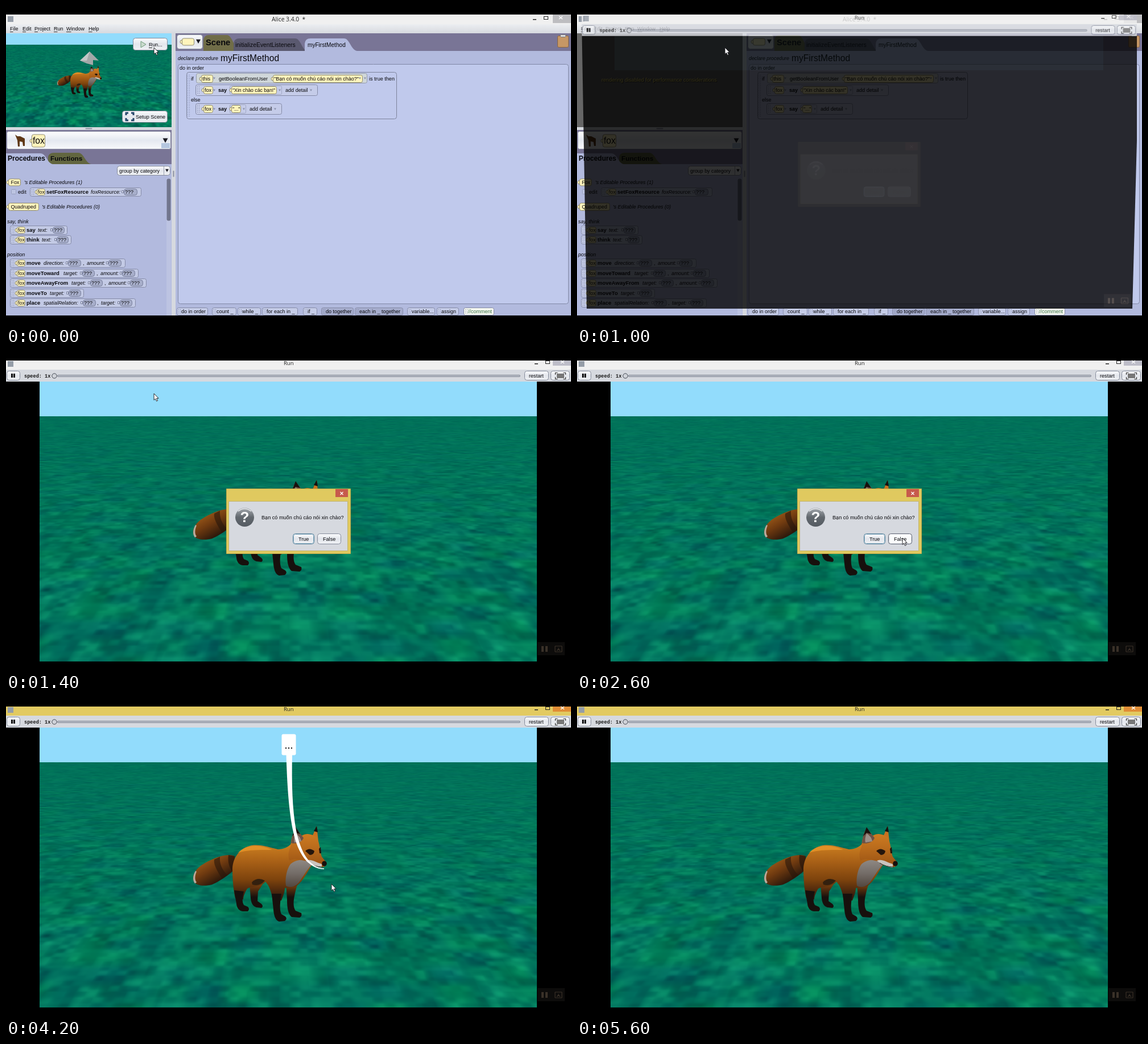
An HTML page with a canvas that plays this animation: 993 by 559 pixels, repeating every 5800 ms.

```html
<!DOCTYPE html>
<html lang="en">
<head>
<meta charset="utf-8">
<title>Alice run</title>
<style>
html, body { margin: 0; width: 100%; height: 100%; overflow: hidden; background: #000; }
canvas { display: block; }
</style>
</head>
<body>
<canvas id="stage" width="993" height="559"></canvas>
<script>
const W = 993, H = 559, LOOP = 5800, STEP = 200;
const SANS = '"Liberation Sans", Arial, sans-serif';
const TITLE = '"Open Sans", sans-serif';
const MONO = '"Liberation Mono", monospace';
const LAV = '#b2bade', PAPER = '#c0c9ec', PURPLE = '#797596', CHROME = '#d6d9df', GOLD = '#e2ca61';
const stage = document.getElementById('stage').getContext('2d');
let c = stage;

function makeLayer(w, h) {
  const el = document.createElement('canvas');
  el.width = w;
  el.height = h;
  return el.getContext('2d');
}

// ---- drawing helpers ----
function rect(x, y, w, h, fill) {
  c.fillStyle = fill;
  c.fillRect(x, y, w, h);
}

function box(x, y, w, h, r, fill, line) {
  c.beginPath();
  c.roundRect(x + .5, y + .5, w - 1, h - 1, r);
  if (fill) { c.fillStyle = fill; c.fill(); }
  if (line) { c.strokeStyle = line; c.lineWidth = 1; c.stroke(); }
}

function shape(d, fill, line, width = 1) {
  const p = new Path2D(d);
  if (fill) { c.fillStyle = fill; c.fill(p); }
  if (line) { c.strokeStyle = line; c.lineWidth = width; c.stroke(p); }
}

function disc(x, y, rx, ry, fill, line) {
  c.beginPath();
  c.ellipse(x, y, rx, ry, 0, 0, 7);
  c.fillStyle = fill;
  c.fill();
  if (line) { c.strokeStyle = line; c.lineWidth = 1; c.stroke(); }
}

function grad(y0, y1, ...stops) {
  const g = c.createLinearGradient(0, y0, 0, y1);
  stops.forEach((s, i) => g.addColorStop(i / (stops.length - 1), s));
  return g;
}

// y is the middle of the capitals
function text(s, x, y, size = 9.1, style = '', color = '#08080c', family = SANS) {
  c.font = `${style} ${size}px ${family}`;
  c.fillStyle = color;
  c.fillText(s, x, y + size * .35);
}

const bold = (s, x, y, size = 9.5) => text(s, x, y, size, 'bold');
const ital = (s, x, y, size = 8.9) => text(s, x, y, size, 'italic');
const down = (x, y, r, color = '#181820') =>
  shape(`M${x - r} ${y - r * .8}h${2 * r}l${-r} ${r * 1.8}z`, color);

function button(x, y, w, h, line = '#858b9b') {
  box(x, y, w, h, 4, grad(y, y + h, '#fbfcfd', '#e3e6ec', '#f0f2f5'), line);
}

function grip(x, y, h) {
  for (let j = 2; j < h - 2; j += 3)
    for (let i = 0; i < 2; i++) rect(x + i * 3, y + j, 1, 1, '#727a9c');
}

function tile(x, y, w, h, fill = '#c3cae5') {
  box(x, y, w, h, 3, fill, '#858ba8');
  grip(x + 3, y + 1, h - 1);
}

function chip(x, y, w, h, label, size = 9.1) {
  const top = y - h / 2, line = '#8f8b70';
  disc(x, y, 3, 3, '#fff4bc', line);
  box(x, top, w, h, 3, '#fff4bc', line);
  text(label, x + 2, y, size);
}

function slot(x, y, w) {
  rect(x, y - 3, 4, 5, '#d5daec');
  box(x, y - 3, 4, 5, 0, null, '#777e9c');
  box(x + 4, y - 6, w - 4, 12, 4, '#a7aeca', '#777e9c');
  text('???', x + 6, y, 9.1);
}

function cursor(x, y) {
  shape(`M${x} ${y}v11.5l2.6-2.3 1.9 4.2 2-.9-1.9-4.1h3.5z`, '#fff', '#15151a', .9);
}

// ---- ground texture ----
function hash(x, y) {
  let n = Math.imul(x, 374761393) + Math.imul(y, 668265263);
  n = Math.imul(n ^ (n >>> 13), 1274126177);
  return ((n ^ (n >>> 16)) >>> 0) / 4294967296;
}

function noise(x, y) {
  const ix = Math.floor(x), iy = Math.floor(y);
  let fx = x - ix, fy = y - iy;
  fx *= fx * (3 - 2 * fx) / fx || 0;
  fy *= fy * (3 - 2 * fy) / fy || 0;
  const a = hash(ix, iy), b = hash(ix + 1, iy);
  const e = hash(ix, iy + 1), f = hash(ix + 1, iy + 1);
  const top = a + (b - a) * fx, bottom = e + (f - e) * fx;
  return top + (bottom - top) * fy;
}

function makeGround(w, h) {
  const g = makeLayer(w, h), img = g.createImageData(w, h);
  for (let y = 0, i = 0; y < h; y++) {
    const d = y + 73, v = 10900 / d, amp = Math.min(1, .05 + d / 400);
    for (let x = 0; x < w; x++, i += 4) {
      const u = (x - w / 2) / (d + 160) * 17;
      const n = (noise(u, v) * .6 + noise(u * 2.1, v * 2.1) * .4 - .5) * amp;
      const m = (noise(u * .6 + 90, v * .6) - .5) * amp;
      img.data[i] = Math.max(0, 1 + n * 20);
      img.data[i + 1] = 113 + n * 62 + m * 18 + y * .012;
      img.data[i + 2] = 89 + n * 34 - m * 8 + y * .008;
      img.data[i + 3] = 255;
    }
  }
  g.putImageData(img, 0, 0);
  return g.canvas;
}

const ground = makeGround(874, 431);

// ---- scene ----
function fox() {
  const dark = '#17100d';
  const leg = grad(325, 350, '#8a4a11', '#4e2a0e', dark);
  shape('M428 326L430 352C431 361 434 366 440 368L449 369Q453 366 449 362L442 357 443 340 452 326Z', leg);
  shape('M492 322L494 355C494 370 496 380 502 385L516 386Q521 383 519 378L509 374C503 365 505 350 514 322Z', leg);
  // tail
  const t = c.createLinearGradient(340, 283, 366, 328);
  t.addColorStop(0, '#a5601a');
  t.addColorStop(.5, '#6f3a10');
  t.addColorStop(1, '#28160b');
  shape('M402 278C388 271 360 283 345 293C334 300 326 312 330 322C334 331 350 331 362 328C378 321 394 309 401 302Z', t);
  shape('M366 284C364 294 374 308 380 318L389 311C379 302 375 290 376 279Z', 'rgba(40,22,10,.6)');
  shape('M391 276C389 288 393 298 397 304L402 300V278Z', 'rgba(40,22,10,.7)');
  shape('M333 304C328 313 328 321 332 326L335 324C331 319 332 312 335 305Z', '#b9aca0');
  // body
  shape('M398 304C397 283 410 263 432 259C450 257 463 263 478 266C488 266 497 262 503 254L525 250 540 290C530 304 524 320 510 331L490 334C490 342 486 350 484 356L469 356C467 343 463 330 456 323C446 334 432 330 424 335C420 342 417 348 417 354L403 352C400 340 398 320 398 304Z',
    grad(258, 350, '#cb7e20', '#a75f16', '#7d430d', '#33190d'));
  shape('M408 272C420 258 446 256 468 267C448 267 428 266 408 272Z', 'rgba(240,156,44,.7)');
  shape('M432 324Q442 314 455 321Q445 332 433 328Z', '#33200f');
  shape('M401 338L405 362C406 370 410 374 416 375L425 375Q429 371 425 367L418 364C414 357 416 348 418 340Z', dark);
  shape('M467 344L470 372C471 384 474 391 480 393L490 392Q495 388 491 384L484 380C480 371 482 358 484 344Z', dark);
  // chest
  shape('M500 292C512 282 528 283 538 292C528 303 522 314 515 324C507 333 498 334 492 330C490 315 494 300 500 292Z',
    grad(284, 333, '#8f8984', '#736c67', '#50453d'));
  // head
  shape('M537 246L546 225 549 252Z', '#c87220');
  shape('M541 234L546 225 548 236Z', dark);
  shape('M500 262C501 246 505 236 509 230L520 242C527 237 537 238 546 245C552 255 551 268 555 279L563 289C564 294 560 298 554 297L529 287C518 285 508 280 498 286C495 276 497 268 500 262Z',
    grad(232, 296, '#d37f22', '#b96b1c', '#995213'));
  shape('M501 255C502 242 506 234 509 228L523 246C520 254 509 257 501 255Z', '#6d5145');
  shape('M509 238Q505 248 507 254L519 252Q518 244 509 238Z', '#9c9089');
  shape('M503 243L509 227 517 239 509 237Z', dark);
  shape('M526 269Q533 262 542 269 541 276 534 276Z', '#24150c');
  shape('M550 265L553 262 554 273 551 273Z', '#24150c');
  shape('M527 286C536 282 543 288 555 292L555 298C545 297 537 294 527 286Z', '#c9c4be');
  shape('M532 290Q543 297 556 297', null, '#33231c', 1);
  disc(559.5, 291, 4.3, 4.6, dark);
}

function scene() {
  rect(59, 52, 874, 62, '#92dcfc');
  c.drawImage(ground, 59, 113);
  fox();
}

function bubble(k) {
  c.save();
  c.translate(559, 300);
  c.scale(k, k);
  c.translate(-559, -300);
  shape('M492.5 100H503C502 150 503 195 510 233C518 270 532 298 559 299.5V301C530 300 513 272 505 236C497 200 494 150 492.5 100Z', '#fff');
  box(484, 63, 26, 38, 3, '#fff');
  for (let i = 0; i < 3; i++) rect(491 + i * 5, 87, 2, 2, '#111');
  c.restore();
}

// ---- editor ----
function windowButtons(x, y, bg, h) {
  rect(961, 15, 32, h, bg);
  rect(x - 3, y + 1, 6, 1.5, '#222');
  c.strokeStyle = '#222';
  c.lineWidth = 1;
  c.strokeRect(x + 16.5, y - 3.5, 7, 5);
  shape(`M${x + 43} ${y - 4}l6 5m0-5l-6 5`, null, '#fff', 1.3);
}

function menuBar() {
  rect(0, 15, W, 17, '#f0f0f0');
  rect(3, 18, 10, 10, '#959da8');
  text('Alice 3.4.0  *', 467, 23, 10.3, '', '#222', TITLE);
  windowButtons(929, 22, '#bdbdc0', 15);
  rect(0, 32, W, 16, grad(32, 48, '#eceef1', CHROME));
  const menus = { File: 7, Edit: 29, Project: 50, Run: 84, Window: 106, Help: 145 };
  for (const [name, x] of Object.entries(menus)) {
    text(name, x, 40, 9);
    rect(x, 45, c.measureText(name[0]).width, 1, '#333');
  }
}

function preview(live) {
  if (!live) {
    rect(0, 48, 291, 165, '#666');
    const msg = 'rendering disabled for performance considerations';
    text(msg, 44, 131, 9.1, '', '#111');
    text(msg, 43, 130, 9.1, '', '#ffec6a');
    return;
  }
  c.save();
  c.beginPath();
  c.rect(0, 48, 291, 165);
  c.clip();
  rect(0, 205, 291, 8, '#00735b');
  c.translate(0, 48);
  c.scale(1 / 3, 1 / 3);
  c.translate(-59, -53);
  scene();
  c.restore();
  shape('M147 80L163 96 153 95V104L142 101 130 96Z', '#a3a8a8');
  shape('M147 80L130 96 142 96Z', '#c3c7c7');
  button(223, 56, 61, 22);
  shape('M237 62l9 5.5-9 5.5z', '#c9dacd', '#6f9a7a');
  text('Run...', 251, 68, 8.9);
  rect(251, 73, 6, 1, '#222');
  button(204, 184, 80, 21);
  shape('M211 192v-4h4m5 0h4v4m0 5v4h-4m-5 0h-4v-4', null, '#27476b', 3);
  text('Setup Scene', 228, 195);
}

function methodRow(y, x, w, name, params) {
  tile(x, y - 8, w, 16);
  chip(x + 12, y, 15, 12, 'fox', 8.9);
  bold(name, x + 29, y);
  params.forEach(([label, lx, sx, sw], i) => {
    if (i) text(',', lx - 7, y);
    ital(label, lx, y);
    slot(sx, y, sw);
  });
}

function members() {
  rect(0, 213, 292, 5, CHROME);
  box(139, 214, 13, 3, 1, '#8c92a2');
  rect(0, 218, 292, 60, PURPLE);
  box(1, 220, 289, 32, 3, grad(220, 252, '#fff', '#e4e8f0', '#f8f9fb'), '#8d90a6');
  shape('M16 226L20 229 25 229 33 233 33 246 30 246 29 239 24 238 24 247 21 247 20 236Z', '#5e3715');
  chip(45, 237, 24, 23, 'fox', 15.7);
  rect(273, 241, 15, 9, '#b5c7e0');
  down(280, 236, 4.5);
  shape('M74 278V266Q75 258 84 258H127C137 258 139 276 150 278Z', '#626640');
  rect(0, 278, 292, 266, LAV);
  shape('M0 278V259H60C71 259 72 276 82 278Z', LAV);
  bold('Procedures', 3, 268, 12);
  bold('Functions', 78, 268, 11.8);
  button(195, 281, 94, 17);
  text('group by category', 199, 290, 8.9);
  rect(277, 282, 1, 15, '#9ba1b1');
  down(283, 289, 2.8);
  rect(282, 303, 8, 241, '#bcc3e2');
  box(282, 303, 8, 75, 3, '#71758d');

  chip(4, 310, 22, 13, ' Fox', 8.9);
  ital("'s Editable Procedures (1)", 32, 310);
  box(9, 322, 9, 9, 1, '#bcc4e2', '#99a1c0');
  text('edit', 21, 327);
  methodRow(327, 42, 196, 'setFoxResource', [['foxResource:', 149, 203, 28]]);
  chip(4, 353, 54, 14, ' Quadruped', 8.9);
  ital("'s Editable Procedures (0)", 63, 353);
  ital('say, think', 2, 379, 9.1);
  methodRow(394, 7, 101, 'say', [['text:', 56, 78, 25]]);
  methodRow(411, 7, 108, 'think', [['text:', 63, 85, 25]]);
  ital('position', 2, 437, 9.1);
  methodRow(452, 7, 203, 'move', [['direction:', 66, 105, 27], ['amount:', 142, 176, 27]]);
  methodRow(470, 7, 226, 'moveToward', [['target:', 101, 130, 26], ['amount:', 166, 200, 27]]);
  methodRow(487, 7, 240, 'moveAwayFrom', [['target:', 115, 144, 26], ['amount:', 180, 214, 27]]);
  methodRow(505, 7, 130, 'moveTo', [['target:', 77, 106, 26]]);
  methodRow(522, 7, 221, 'place', [['spatialRelation:', 66, 131, 27], ['target:', 167, 196, 26]]);
  rect(291, 48, 7, 496, CHROME);
  box(293, 289, 3, 12, 1, '#8c92a2');
}

function codeTabs() {
  rect(298, 48, 695, 31, PURPLE);
  button(300, 50, 46, 26);
  chip(309, 63, 22, 13, '');
  down(338, 62, 4);
  shape('M347 79V60Q348 51 357 51H388C398 51 401 76 412 79Z', '#706d48');
  bold('Scene', 351, 64, 14.7);
  shape('M400 79V66Q401 57 410 57H508C518 57 520 77 529 79Z', '#5a596f');
  text('initializeEventListeners', 403, 68, 10.4);
  shape('M525 79V66Q526 57 535 57H594C604 57 606 77 617 79Z', LAV);
  text('myFirstMethod', 530, 68, 10.1);
  box(969, 52, 20, 21, 2, '#c69765', '#8d663e');
  box(974, 50, 10, 5, 1, '#ddd', '#777');
}

function sayRow(y, w, arg, argW, detailX) {
  tile(333, y - 10, w, 20, '#c5cce9');
  chip(347, y, 17, 14, 'fox');
  down(366, y, 2, '#8990aa');
  bold('say', 373, y, 9.1);
  box(393, y - 8, argW + 12, 16, 2, null, '#a0a7c4');
  chip(396, y, argW, 14, arg, 8.7);
  down(401 + argW, y, 2, '#8990aa');
  text('add detail', detailX, y);
  down(detailX + 45, y, 2, '#8990aa');
}

function code() {
  rect(298, 79, 695, 465, LAV);
  ital('declare procedure', 302, 92, 8.8);
  text('myFirstMethod', 377, 92, 15.6);
  box(302, 102, 687, 422, 4, PAPER, '#8188a6');
  text('do in order', 305, 109, 9);
  box(317, 116, 370, 83, 4, PAPER, '#7d839c');
  grip(319, 119, 77);
  text('if', 325, 128);
  box(334, 118, 301, 18, 3, '#d0d7da', '#9298a8');
  chip(343, 128, 21, 14, 'this');
  down(366, 127, 2, '#8990aa');
  text('getBooleanFromUser', 374, 128, 9.05);
  chip(469, 128, 158, 14, '"Bạn có muốn chú cáo nói xin chào?"', 9);
  down(622, 127, 2, '#8990aa');
  down(631, 127, 2, '#8990aa');
  text('is true then', 638, 128);
  sayRow(148, 215, '"Xin chào các bạn!"', 80, 491);
  text('else', 325, 165);
  sayRow(181, 152, '"..."', 17, 428);
}

function statementBar() {
  const items = [
    ['do in order', 300, 55], ['count _', 362, 43], ['while _', 407, 41],
    ['for each in _', 450, 63], ['if _', 522, 25], ['do together', 554, 57, 1],
    ['each in _ together', 613, 85, 1], ['variable...', 705, 49], ['assign', 757, 39]
  ];
  for (const [label, x, w, dim] of items) {
    tile(x, 530, w, 14, dim ? '#a6adcd' : '#c5cce7');
    text(label, x + 8, 537, 9);
  }
  tile(804, 530, 54, 14, '#f3f6ef');
  text('//comment', 812, 537, 9, '', '#3c7548');
}

function editor(live) {
  rect(0, 0, W, H, '#000');
  menuBar();
  preview(live);
  members();
  codeTabs();
  code();
  statementBar();
}

// ---- run window ----
function dialog(hover) {
  box(387, 240, 219, 115, 0, '#e0c95f', '#c0aa48');
  rect(579, 241, 22, 14, '#c75a4c');
  shape('M587.5 246l5 5m0-5l-5 5', null, '#fff', 1.3);
  box(391, 262, 210, 88, 0, CHROME, '#c2b472');
  disc(419.5, 290.5, 16.5, 16.5, grad(274, 307, '#a5aab0', '#62686e', '#555b62'));
  shape('M408 280Q419 271 431 280', null, '#eceef0', 1.5);
  text('?', 411.5, 290, 26, 'bold', '#fff');
  text('Bạn có muốn chú cáo nói xin chào?', 449, 291, 9.15);
  button(504, 319, 38, 19, '#56809a');
  box(505, 320, 36, 17, 3, null, '#8fb2c5');
  text('True', 514, 329);
  button(547, 319, 42, 19, hover ? '#5b6170' : '#858b9b');
  if (hover) box(549, 321, 38, 15, 3, '#fafbfc');
  text('False', 557, 329);
}

function runChrome(active) {
  rect(0, 0, W, H, '#000');
  rect(0, 15, W, 17, active ? GOLD : '#f0f0f0');
  rect(3, 16, 10, 10, '#959da8');
  text('Run', 488, 20, 9.5, '', '#222', TITLE);
  windowButtons(932, 19, active ? '#e08d36' : '#bdbdc8', 9);
  rect(0, 31, W, 21, CHROME);
  button(1, 33, 24, 17);
  rect(9, 38, 3, 7, '#111');
  rect(13, 38, 3, 7, '#111');
  text('speed: 1x', 32, 42, 8.6, 'bold', '#181818', MONO);
  box(90, 40, 814, 4, 2, '#b5bac4', '#888d99');
  disc(85, 42, 4.2, 4.2, '#d0d3d9', '#444a54');
  button(911, 33, 43, 17);
  text('restart', 919, 42);
  button(957, 33, 34, 17);
  rect(968, 38, 13, 8, '#777');
  shape('M965.5 40v-3.500h4m10 0h4v3.500m0 4v3.500h-4m-10 0h-4v-3.500', null, '#333', 1.2);
}

function recorder(bright) {
  if (bright) {
    box(932, 509, 53, 30, 4, 'rgba(225,225,235,.6)');
    box(935, 512, 47, 24, 2, grad(512, 536, '#8d8b93', '#625f68'), '#aaa8b0');
  } else {
    rect(934, 510, 48, 23, '#0d0c0b');
  }
  const ink = bright ? '#aaa8ae' : '#3a3128';
  rect(941, 517, 4, 10, ink);
  rect(948, 517, 4, 10, ink);
  shape('M965 517h12m-12 10h12m-6-7v4m-3 1l3-3 3 3m-9-8v10m12-10v10', null, ink, 1.2);
}

const layer = makeLayer(W, H);

// the run window fades in over the editor, slightly shrunk
function opening() {
  editor(false);
  c = layer;
  runChrome(false);
  c.globalAlpha = .04;
  rect(59, 52, 874, 61, '#92dcfc');
  dialog(false);
  c.globalAlpha = 1;
  recorder(false);
  c = stage;
  c.save();
  c.beginPath();
  c.moveTo(8, 15);
  c.lineTo(990, 15);
  c.lineTo(976, 532);
  c.lineTo(17, 532);
  c.clip();
  c.globalAlpha = .8;
  c.drawImage(layer.canvas, 0, 15, W, 529, 8, 16, W * .983, 524);
  c.restore();
}

function draw(t) {
  if (t < 1000) {
    editor(t < 400);
    if (t >= 600) recorder(true);
    cursor(260, 73);
    return;
  }
  if (t < 1200) {
    opening();
    cursor(260, 73);
    return;
  }
  const asking = t < 3200;
  runChrome(!asking);
  scene();
  if (asking) dialog(t >= 2400);
  const grow = Math.min(1, (t - 3400) / 400, (5400 - t) / 400);
  if (grow > 0) bubble(grow);
  recorder(false);
  const p = Math.min(1, Math.max(0, (t - 1400) / 1000));
  const e = p * p * (3 - 2 * p);
  if (t < 5400) cursor(260 + 312 * e, 73 + 254 * e);
}

const start = performance.now();
let shown = -1;
function tick() {
  const t = (performance.now() - start) % LOOP;
  const now = Math.floor(t / STEP) * STEP;
  if (now !== shown) draw(shown = now);
  requestAnimationFrame(tick);
}
tick();
</script>
</body>
</html>
```
